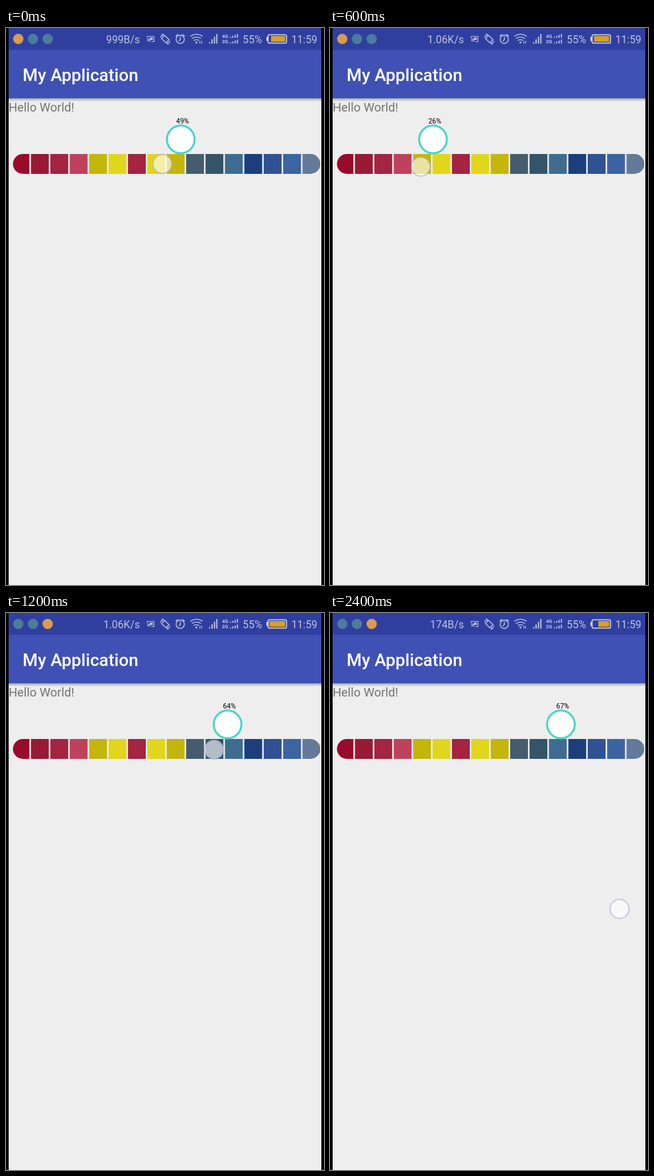
An HTML page with a canvas that plays this animation: 480 by 840 pixels, repeating every 2.5 s.

```html
<!DOCTYPE html>
<html lang="en">
<head>
<meta charset="utf-8">
<title>Segmented colour slider</title>
<style>
html, body { margin: 0; width: 100%; height: 100%; overflow: hidden; background: #000; }
canvas { display: block; width: 480px; height: 840px; }
</style>
</head>
<body>
<canvas id="stage" width="480" height="840"></canvas>
<script>
const g = document.getElementById('stage').getContext('2d');
const LOOP = 2500, STEP = 100, TAU = Math.PI * 2;
const LIGHT = '#bdc3e3';
const FONT = 'Roboto, "Open Sans", sans-serif';
const COLORS = ['#970b2b', '#981a34', '#a42441', '#bf425d', '#c4b60a', '#e0d61c',
  '#a42441', '#e0d61c', '#c4b60a', '#445c6e', '#345468', '#3e6c90',
  '#1c3e7c', '#305292', '#3c64a2', '#647a9a'];

// Keys are [time, value]
const PERCENT = [[0, 49], [200, 30], [300, 27], [400, 26], [600, 26], [700, 30],
  [800, 38], [1000, 55], [1200, 64], [1300, 67]];
const TOUCH_X = [[0, 236], [200, 148], [300, 139], [400, 136], [600, 137], [700, 162],
  [800, 200], [1000, 278], [1200, 314], [1300, 325], [1400, 326]];
const TOUCH_Y = [[0, 205], [200, 212], [600, 209], [1000, 205], [1400, 207]];
const BATTERY = [[0, 400], [1000, 397.5], [1800, 397.5]];
const SPEED = [[0, '999B/s'], [500, '1.06K/s'], [1300, '635B/s'], [2400, '174B/s']];

function tween(keys, t) {
  const i = keys.findIndex(k => k[0] > t);
  if (i < 0) return keys[keys.length - 1][1];
  const [t0, a] = keys[i - 1], [t1, b] = keys[i];
  return a + (b - a) * (t - t0) / (t1 - t0);
}

function latest(keys, t) {
  return keys.filter(k => k[0] <= t).pop()[1];
}

function rect(x, y, w, h, color) {
  g.fillStyle = color;
  g.fillRect(x, y, w, h);
}

function text(s, x, y, size, color, align = 'left', weight = 400) {
  g.font = `${weight} ${size}px ${FONT}`;
  g.fillStyle = color;
  g.textAlign = align;
  g.fillText(s, x, y);
}

function disc(x, y, r, fill, line, width) {
  g.beginPath();
  g.arc(x, y, r, 0, TAU);
  if (fill) { g.fillStyle = fill; g.fill(); }
  if (line) { g.strokeStyle = line; g.lineWidth = width; g.stroke(); }
}

function stroke(d, width = 1.3) {
  g.strokeStyle = LIGHT;
  g.lineWidth = width;
  g.stroke(new Path2D(d));
}

function bars(x, base, step, width, low, rise, count) {
  for (let i = 0; i < count; i++) {
    const h = low + rise * i;
    rect(x + i * step, base - h, width, h, LIGHT);
  }
}

function statusIcons() {
  // cast
  stroke('M213 15V12.7H223.4V20.5H219.5M213 16.2a4.4 4.4 0 0 1 4.4 4.4M213 18.4a2.2 2.2 0 0 1 2.2 2.2', 1.1);
  rect(217, 14.5, 4.5, 3.5, LIGHT);
  // rotation
  stroke('M239.2 11L246 17.5L241.5 22.5L234.8 16Z', 1.4);
  stroke('M233.5 14.5Q233.5 10.5 237.5 9.8M247.3 19Q247 23 243 23.8', 1.2);
  stroke('M235.5 8.5L238 9.8L236.5 12M245.5 25L243 23.8L244.5 21.5', 1);
  // alarm
  disc(263, 17, 6.2, null, LIGHT, 1.4);
  stroke('M263.2 13V17.2L261 19.7M256.3 12.4L259.6 9.5M269.7 12.4L266.4 9.5', 1.4);
  // wifi
  stroke('M278.3 12.3Q287.5 6.5 296.8 12.3M280.8 15.8Q287.5 11.5 294.2 15.8M283.4 19Q287.5 16.3 291.4 19', 1.4);
  disc(287.4, 21.8, 1.5, LIGHT);
  stroke('M292.6 23.5V19.5M295.2 19.5V23.5', 1.1);
  // signal
  bars(306.5, 23.5, 3.6, 1.9, 2.2, 4.1, 4);
  text('4G', 326, 14.8, 7.5, LIGHT, 'left', 700);
  text('2G', 326, 23.3, 7.5, LIGHT, 'left', 700);
  for (const y of [14.8, 23.3]) bars(338, y, 3.5, 1.7, 1.6, 1.4, 4);
}

function statusBar(t) {
  rect(4, 0, 472, 33, '#303f9f');
  const orangeAt = t < 800 ? 0 : 2;
  for (let i = 0; i < 3; i++) {
    disc(18.5 + i * 22.2, 16.5, 7.8, i === orangeAt ? '#d99b4f' : '#4b7c9d');
  }
  text(latest(SPEED, t), 202, 23, 15.73, LIGHT, 'right');
  statusIcons();
  text('55%', 357.3, 23, 15.73, LIGHT);

  g.strokeStyle = '#d0d4ea';
  g.lineWidth = 1.6;
  g.beginPath();
  g.roundRect(395.6, 10.3, 27.8, 12.4, 2);
  g.stroke();
  rect(393, 13.5, 2, 6, '#d0d4ea');
  const left = t < 1900 ? tween(BATTERY, t) : 405;
  rect(left, 12, 421.3 - left, 8.8, '#d4a02c');
  text('11:59', 469.8, 23, 15.73, LIGHT, 'right');
}

function appBar() {
  rect(4, 33, 472, 73, '#3f51b5');
  const shade = g.createLinearGradient(0, 106, 0, 111);
  shade.addColorStop(0, 'rgba(0,0,0,.3)');
  shade.addColorStop(1, 'rgba(0,0,0,0)');
  rect(4, 106, 472, 5, shade);
  text('My Application', 25, 80, 26.2, '#fff', 'left', 500);
}

function slider(t) {
  g.save();
  g.beginPath();
  g.roundRect(10.5, 190, 464, 30, 15);
  g.clip();
  COLORS.forEach((c, i) => rect(8.4 + i * 29.28, 190, 26.9, 30, c));
  g.restore();

  const p = tween(PERCENT, t), x = 33 + p * 4.71;
  disc(x, 168, 20.9, '#fff', '#45d5c6', 3);
  text(Math.round(p) + '%', x - 7, 143.7, 10.49, '#000');
}

function touch(x, y, alpha) {
  g.globalAlpha = alpha;
  disc(x, y, 14.2, 'rgba(255,255,255,.62)', 'rgba(165,168,212,.55)', 2);
  g.globalAlpha = 1;
}

function draw(t) {
  rect(0, 0, 480, 840, '#000');
  rect(4, 106, 472, 734, '#eeeeee');
  statusBar(t);
  appBar();
  text('Hello World!', 4, 126, 18.35, '#737373');
  slider(t);
  if (t < 1600) {
    const fade = t < 1400 ? 1 : t < 1500 ? 0.5 : 0.2;
    touch(tween(TOUCH_X, t), tween(TOUCH_Y, t), fade);
  } else if (t >= 2400) {
    touch(437, 446.3, 1);
  }
}

const start = performance.now();
function tick() {
  const t = (performance.now() - start) % LOOP;
  draw(Math.floor(t / STEP) * STEP);
  requestAnimationFrame(tick);
}
tick();
</script>
</body>
</html>
```
